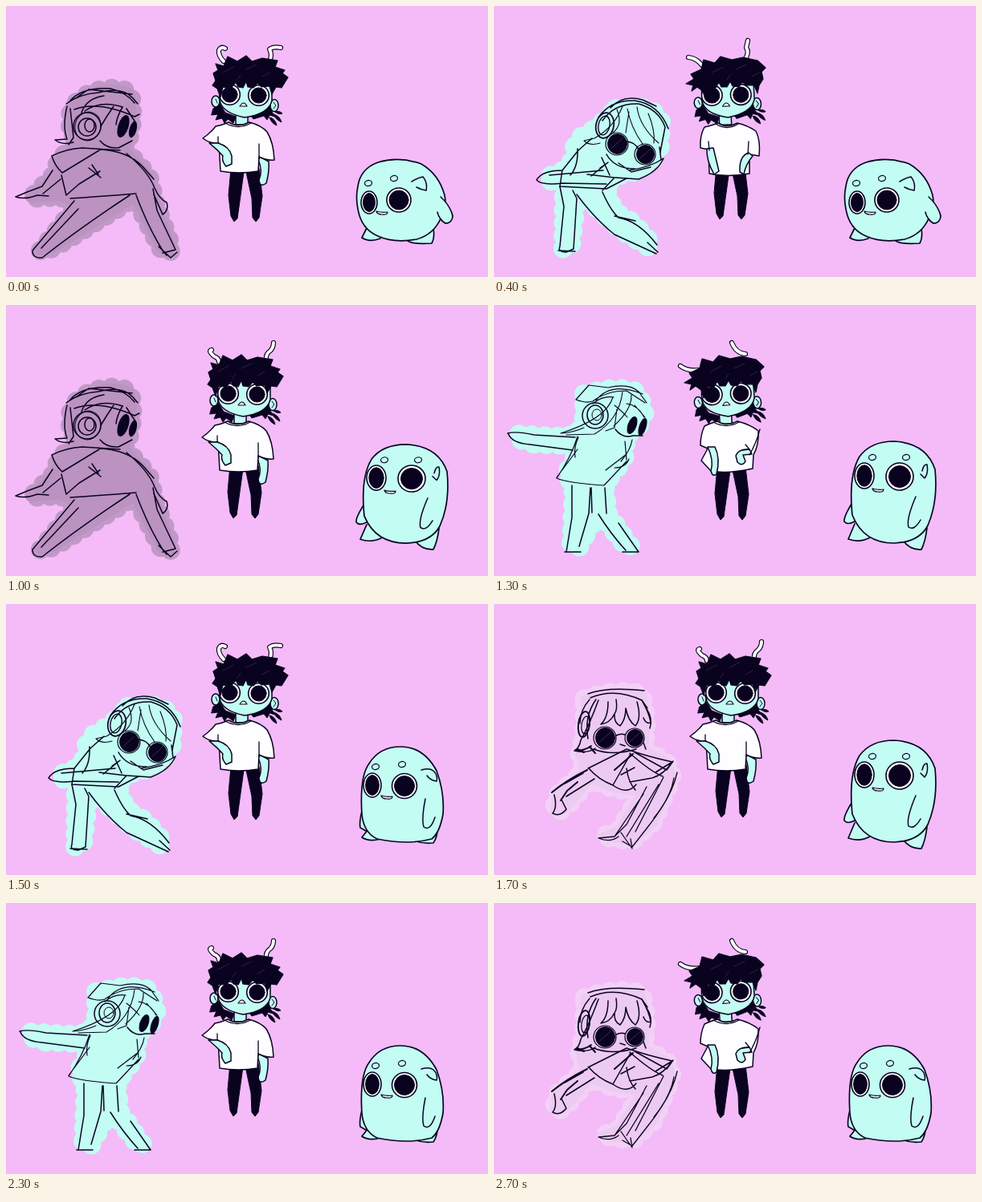
An HTML page for the animation above (2.8 s loop, 600 px wide and 338 px high).

```html
<!DOCTYPE html>
<html lang="en">
<head>
<meta charset="utf-8">
<title>Dance sketch</title>
<style>
html, body { margin: 0; width: 100%; height: 100%; overflow: hidden; background: #f4bbf8; }
svg { display: block; width: 100vw; height: 100vh; }
</style>
</head>
<body>
<svg id="stage" viewBox="0 0 600 338" fill="none" stroke-linecap="round" stroke-linejoin="round"></svg>
<script>
const INK = '#0a0320', TEAL = '#c2fcf3', WHITE = '#fefdff';
const stage = document.getElementById('stage');

const path = (d, fill = 'none', w = 1.5, ink = INK) =>
  `<path d="${d}" fill="${fill}" stroke="${ink}" stroke-width="${w}"/>`;
const oval = (x, y, rx, ry = rx, fill = 'none', w = 1.5, turn = 0) =>
  `<ellipse cx="${x}" cy="${y}" rx="${rx}" ry="${ry}" fill="${fill}" stroke="${INK}" stroke-width="${w}" transform="rotate(${turn} ${x} ${y})"/>`;
const group = (body, transform) => `<g transform="${transform}">${body}</g>`;
const shift = (body, x, y) => group(body, `translate(${x} ${y})`);
const eye = (x, y, rx, ry, gap) => oval(x, y, rx, ry, WHITE, 1.6) + oval(x, y, rx - gap, ry - gap, INK, 1);
const lens = (x, y, r) => oval(x, y, r, r, 'none', 1.2) + oval(x + .5, y, r - 2, r - 1.5, INK, 1) +
  path(`M${x - r * .5} ${y + r * .4}L${x + r * .5} ${y - r * .5}`, 'none', .5, '#65566f');

// Filled silhouette with a scalloped brush edge
const halo = (d, color, rim = color) =>
  `<path d="${d}" stroke="${rim}" stroke-width="24" stroke-dasharray="0 16"/>` + path(d, color, 10, color);

/* ---------- dancer ---------- */
function reach() {
  return halo('M80 150Q76 125 98 112Q130 96 155 108Q162 150 148 178L178 212L186 245L207 302L203 309L192 302L160 240L60 302L42 306L90 246L66 238L30 240L60 210L66 190L88 174Z', '#bb92c0', '#c199c7') +
    path('M75 122Q90 110 115 108Q145 100 158 115L164 122M80 118Q95 101 130 103Q150 108 160 121M88 114L103 104L157 110M85 129Q115 118 160 138L166 135M76 125Q70 150 76 166L61 167Q70 174 84 170M80 128L84 164L78 173M94 133Q100 115 122 112M98 131Q118 117 145 126') +
    oval(101, 150, 17, 17) + oval(102, 150, 16, 18, 'none', 1, 15) + oval(101, 151, 11) + oval(104, 149, 6, 8) +
    oval(146, 150, 6, 14, INK, 1, 18) + oval(158, 154, 4, 10, INK, 1, 15) +
    path('M134 125Q125 138 118 150M145 126Q138 138 137 148M150 128L161 145M117 168Q125 178 140 177L157 168') +
    path('M57 187Q75 178 95 177L142 180M57 187Q61 200 70 208M69 211L75 236L91 222L117 206M70 208L116 180M116 179Q150 180 170 200L184 216M150 184Q177 206 185 227Q191 241 200 245Q203 255 195 260L184 235M58 205L45 225Q28 231 12 238Q23 242 39 236L53 237M68 216L46 234M103 202L118 214M107 198L115 210') +
    path('M85 243L33 305Q33 315 45 314Q93 276 154 236M80 240Q110 238 162 234M44 302L90 253M162 236Q177 276 195 305L200 311M183 228L188 255L211 304L195 308M190 300L205 314L213 307');
}

function lean() {
  return halo('M152 128Q190 120 208 140L207 175Q196 206 160 209L138 224L150 256L174 270L195 295L194 302L160 281L104 232L96 300L86 304L87 223L64 216L74 209L91 203L103 181L96 184L105 165L130 150Z', TEAL) +
    path('M130 139Q145 117 175 118Q205 122 217 153M135 143Q150 121 180 122Q205 129 213 151L207 182M145 127Q160 110 185 117L202 125') +
    oval(138, 149, 11, 16, 'none', 1.7, 12) + oval(137, 149, 7, 12, 'none', 1.4, 12) +
    path('M160 125Q150 151 125 165L112 168Q119 175 132 171M166 128Q170 151 185 172M178 126Q181 150 205 171M153 129Q161 148 148 158M168 132L164 158M192 134Q201 156 199 171', 'none', 1.1) +
    lens(153, 172, 14) + lens(188, 185, 13) +
    path('M165 169Q176 170 180 179M140 185Q150 203 175 203M168 205Q195 201 211 190Q204 207 180 216L151 214M155 196L171 207L195 201M206 176L208 192') +
    path('M122 165L105 180L85 205L82 225L140 228L165 215M121 212L142 195L132 202M134 189L144 211M104 178Q105 200 95 211M85 205Q60 205 53 217Q59 224 85 221L140 222M69 211L136 205M116 210L150 214L135 230') +
    path('M82 225L87 250L82 300Q79 307 90 307L99 303L103 240L98 230M80 305L101 306M103 235Q125 265 150 285L202 309M135 232Q145 255 155 264Q180 268 203 298M150 262L176 268M191 295L204 307');
}

function fold(color, rim, lifted) {
  const head = path('M117 112Q140 103 187 108M120 117Q150 104 184 120L191 130M119 119Q107 133 107 149', 'none', 1.4) +
    oval(112, 150, 7, 16, 'none', 1.9, 8) + oval(114, 151, 5, 11, 'none', 1.2, 8) +
    path('M130 120Q119 150 108 170Q106 180 100 183Q116 187 126 180M127 119Q112 140 117 168M142 122Q142 142 133 150Q144 149 150 137Q149 148 157 152Q164 144 164 130Q167 146 176 152Q184 143 178 122M152 119Q154 132 150 137M184 120Q194 138 195 148Q189 150 186 142M190 131Q198 143 194 155') +
    lens(138, 167, 14) + lens(175, 167, 12) + path('M152 164Q158 161 163 163M124 181Q147 190 177 181M186 173L189 181M157 175L163 177') +
    path('M101 183Q113 183 121 177M104 181L112 185M119 178L126 186', 'none', 2);
  const body = path('M117 205L165 181Q190 190 222 197Q212 203 201 210M118 205Q130 219 148 226L170 187M169 186Q195 209 210 215M175 185L215 207L223 196M222 197Q211 213 197 217L169 222M111 211L88 224M125 218L90 240M75 238Q79 254 73 261Q82 266 90 256L84 244M148 226Q166 239 177 225M165 205Q167 222 176 232M158 213L175 204') +
    path('M116 207Q90 220 72 235M104 222L91 233L83 245M150 207L173 187', 'none', 2) +
    path('M190 228L165 275L150 290L130 292Q145 298 155 290M228 210Q222 240 190 280L172 303L160 296M205 225L165 290M211 216L176 284M224 217Q220 241 199 267M158 285L172 305L170 293M150 290L186 237', 'none', 1.3);
  return halo('M113 118Q150 105 184 112L190 145L187 181L215 197L222 216L199 272L172 296L134 290L155 282L184 235L150 231L120 219L87 257L75 259L77 240L112 208L106 185L112 165Z', color, rim) +
    (lifted
      ? group(head, 'translate(2 -5) rotate(9 157 167)') + shift(body, 3, 0)
      : head + body);
}

function swing() {
  return halo('M112 111L130 107Q155 101 178 108L188 130Q186 153 165 162L162 193L138 224L142 260L171 302L164 301L130 259L106 302L96 302L99 225L89 212L102 187L95 175L45 173L26 165L29 161L75 164L104 162L112 140Z', TEAL) +
    path('M102 118L118 100L142 103Q168 97 180 108L190 122M102 118Q115 123 123 120Q140 107 165 107L188 122M127 119Q145 95 185 111M123 123Q135 113 149 115', 'none', 1.2) +
    oval(126, 138, 16) + oval(126, 137, 10, 12) + oval(128, 137, 6, 7, 'none', 1) +
    path('M148 115Q140 142 83 160Q99 159 112 153M160 108Q156 143 125 161L90 162M171 112Q172 130 149 151M150 125Q160 133 166 140M175 125L188 140M153 130L150 153L139 157M165 123Q179 125 187 140', 'none', 1.1) +
    oval(172, 150, 5, 11, INK, 1, 20) + oval(185, 152, 4, 11, INK, 1, 18) +
    path('M151 155Q160 167 173 163L185 163M17 160Q27 157 50 162L101 165M18 161Q22 172 45 174L98 181') +
    path('M104 164Q96 190 78 216Q91 222 137 225L165 195M105 165Q99 178 101 190M163 170L165 193M158 195Q170 181 172 168M139 206L165 186M150 203Q164 203 168 192M78 215L104 180', 'none', 1.2) +
    path('M97 225L97 265L90 308M120 228L118 260L106 301M88 308L108 308M138 228L140 260M130 261Q145 285 164 306M155 272L180 308L160 308M121 228L122 259');
}

const faint = () => fold('#edcaf1', '#f3d1f6', false);
const white = () => fold(WHITE, WHITE, true);
const dancer = [reach, reach, swing, swing, lean, lean, faint, faint, white, white];

/* ---------- boy ---------- */
const HAIR = [
  'M267 114L263 103L257 99L261 93L258 84L264 80L261 72L271 75L276 63L288 69L299 62L306 69L319 65L338 68L335 76L347 80L344 84L351 89L343 102L336 101L331 110L328 100L318 101L313 96L308 102L301 101L299 94L295 102L289 101L286 95L281 101L274 102L270 101Z',
  'M261 116L258 106L251 101L244 106L246 99L237 97L247 91L243 85L256 79L259 67L273 71L280 63L294 67L308 64L326 68L336 77L331 82L333 91L328 99L326 109L322 99L312 99L307 95L303 101L295 100L292 94L288 101L281 101L278 95L274 102L266 102Z'
];
const face = () =>
  path('M258 128L266 122L273 133L286 138L283 146L276 141L272 146L269 140L261 142L264 135L256 136ZM326 122L333 126L331 132L335 138L328 136L325 142L321 137L308 141L305 137Z', INK, 1) +
  path('M286 134L286 148L301 148L301 134', TEAL) +
  oval(261, 119, 5, 7, TEAL) + oval(334, 124, 5, 7.5, TEAL) + path('M333 120L336 124L333 128M261 116L263 121', 'none', 1) +
  path('M266 92L266 117Q268 133 297 139Q327 135 331 118L331 92Z', TEAL) +
  eye(278.5, 110.5, 12.8, 12.8, 3.2) + eye(314.5, 111.5, 12.8, 12.8, 3.2) + path('M291 125Q296 117 300 125Z', WHITE, 1.1) +
  path('M328 139Q335 140 337 149Q330 146 328 139ZM333 135Q341 137 343 145Q336 142 333 135ZM335 132Q340 130 344 134Q340 136 335 132Z', INK, 1);

const antenna = d => path(d, 'none', 6.2) + path(d, 'none', 3.9, WHITE);
const legs = () =>
  path('M280 203L277 236L280 262L284 269L288 265L292 236L296 207ZM299 207L306 240L307 264L311 269L315 264L319 237L315 203Z', INK, 1);

const SHIRTS = {
  hips: () =>
    path('M316 188L327 194Q328 206 324 221Q316 227 315 217Q320 205 314 192Z', TEAL) +
    path('M277 145Q268 149 261 150Q255 158 245 165Q254 172 265 171L267 206Q290 210 314 206L315 188Q324 193 334 192Q333 170 325 157Q318 149 303 145Q289 152 277 145Z', WHITE) +
    path('M253 171L264 171Q278 175 281 187L281 197L274 200Q268 193 270 187Q263 179 253 171Z', TEAL) +
    path('M273 146Q289 155 305 146M315 172L315 190M264 163L264 171', 'none', 1.3),
  straight: () =>
    path('M279 146Q268 150 262 151Q256 162 257 177L267 179L268 209Q290 214 318 209L318 185L330 187Q332 168 326 156Q316 149 303 146Q290 153 279 146Z', WHITE) +
    path('M265 178L273 177L280 206L274 210Q264 192 265 178ZM317 183Q305 187 306 207L311 210Q313 198 322 187Z', TEAL) +
    path('M276 147Q290 156 304 147M267 169L268 180M317 169L316 185', 'none', 1.3),
  drop: () =>
    path('M278 145Q268 148 262 151Q257 162 257 175L266 179L258 194L270 207Q290 211 322 204L323 187Q330 174 329 157Q319 149 303 145Q289 152 278 145Z', WHITE) +
    path('M266 177L275 177Q282 191 277 211Q272 215 270 207Q274 194 266 177ZM318 180Q304 179 301 188L303 196Q309 202 313 195L310 187L321 186Z', TEAL) +
    path('M273 146Q289 155 305 146M313 174L318 180L309 181M331 155Q327 171 318 187', 'none', 1.3)
};

function boy({ hair = 0, hx = 0, fx = 0, tilt = 0, shirt = 'hips', lx = 0, ly = 0, left, right }) {
  const shine = path('M270 83L283 76M299 79L312 73M319 88L328 83M288 92L292 86', 'none', .5, '#51435c');
  return antenna(left) + antenna(right) + shift(legs(), lx, ly) +
    group(face(), `translate(${fx} 0) rotate(${tilt} 297 115)`) +
    shift(SHIRTS[shirt](), shirt === 'hips' ? lx : 0, 0) +
    shift(path(HAIR[hair], INK, 1.2) + shine, hx, 0);
}

const sway = [
  { left: 'M271 69Q264 62 265 55Q268 50 273 53', right: 'M328 69Q332 61 328 54Q333 50 342 52' },
  { hx: -6, fx: -2, lx: -1, ly: -3, left: 'M265 71Q265 66 259 64Q251 57 256 56', right: 'M324 68Q323 61 329 57Q333 53 333 47' },
  { hair: 1, hx: 2, fx: -7, tilt: -3, shirt: 'straight', lx: -3, ly: -3, left: 'M259 74Q252 65 242 64', right: 'M313 66Q318 57 314 52L316 43' },
  { hair: 1, fx: -7, tilt: -4, shirt: 'drop', lx: -2, ly: -1, left: 'M256 81Q241 83 232 76', right: 'M313 61Q301 60 296 47' }
];
const swayOrder = [0, 0, 1, 1, 2, 2, 3];

/* ---------- blob ---------- */
const skin = d => path(d, TEAL, 1.7);
const spot = (x, y) => oval(x, y, 4.5, 3.5, TEAL, 1.2, -12);
const smile = (x, y) => path(`M${x - 7} ${y - 2}Q${x} ${y} ${x + 7} ${y - 1}Q${x + 7} ${y + 3} ${x} ${y + 2}Q${x - 6} ${y + 2} ${x - 7} ${y - 2}Z`, WHITE, 1.2);

const squat = () =>
  skin('M450 275L443 289Q452 295 466 290M498 290Q500 298 530 296Q534 289 532 278') +
  skin('M540 238Q553 250 556 262Q555 271 547 271Q539 266 536 256') +
  skin('M438 225Q441 203 463 195Q489 187 517 197Q539 210 546 236Q549 251 542 263Q533 285 511 291Q483 296 463 287Q442 278 438 253Q435 238 438 225Z') +
  path('M541 238Q553 249 556 262Q555 271 547 271Q539 266 537 257', TEAL) + path('M536 240L545 252', 'none', 4, TEAL) +
  path('M505 219Q513 214 519 213Q525 220 523 230Q516 229 511 226') +
  spot(451, 221) + spot(483, 215) + eye(452, 245, 10, 14, 2.5) + eye(489, 242, 15, 15, 3) + smile(468, 258);

const tall = () =>
  skin('M449 273L441 292Q455 297 468 290M508 292Q517 306 532 305Q537 295 539 278') +
  skin('M447 245Q435 264 436 270Q440 275 449 270') +
  skin('M446 262Q441 213 455 189Q469 170 498 170Q538 172 549 205Q553 245 540 275Q529 296 498 297Q460 297 446 262Z') +
  path('M525 239Q513 267 516 277Q523 282 531 268M533 207Q535 198 539 199Q541 210 536 216L531 211') +
  spot(471, 190) + spot(513, 190) + eye(461, 213, 12, 16, 2.8) + eye(505, 214, 17, 17, 3.5) + smile(478, 231);

const settled = () =>
  skin('M446 248Q439 270 441 279L448 283M451 281L443 291Q452 297 466 293M503 293Q517 300 532 298Q538 289 537 275') +
  skin('M443 262Q440 215 452 199Q465 178 491 178Q520 178 536 208Q546 235 544 262Q540 285 530 293Q500 301 462 293Q445 285 443 262Z') +
  path('M522 243Q517 268 520 278Q528 284 534 266M517 207Q527 204 532 208Q538 214 536 221Q528 220 524 214') +
  spot(460, 203) + spot(493, 200) + eye(456, 226, 11, 15, 2.6) + eye(496, 227, 15.5, 15.5, 3) + smile(474, 241);

const blob = [squat, tall, () => group(tall(), 'translate(0 9) scale(1 .97)'), settled];

/* ---------- playback ---------- */
const STEP = 100, LOOP = 2800;
let shown = -1;

function draw(n) {
  stage.innerHTML = '<rect width="600" height="338" fill="#f4bbf8"/>' +
    dancer[n % 10]() + boy(sway[swayOrder[n % 7]]) + blob[n % 4]();
}

function tick() {
  const n = Math.floor(performance.now() % LOOP / STEP);
  if (n !== shown) draw(shown = n);
  requestAnimationFrame(tick);
}
tick();
</script>
</body>
</html>
```
